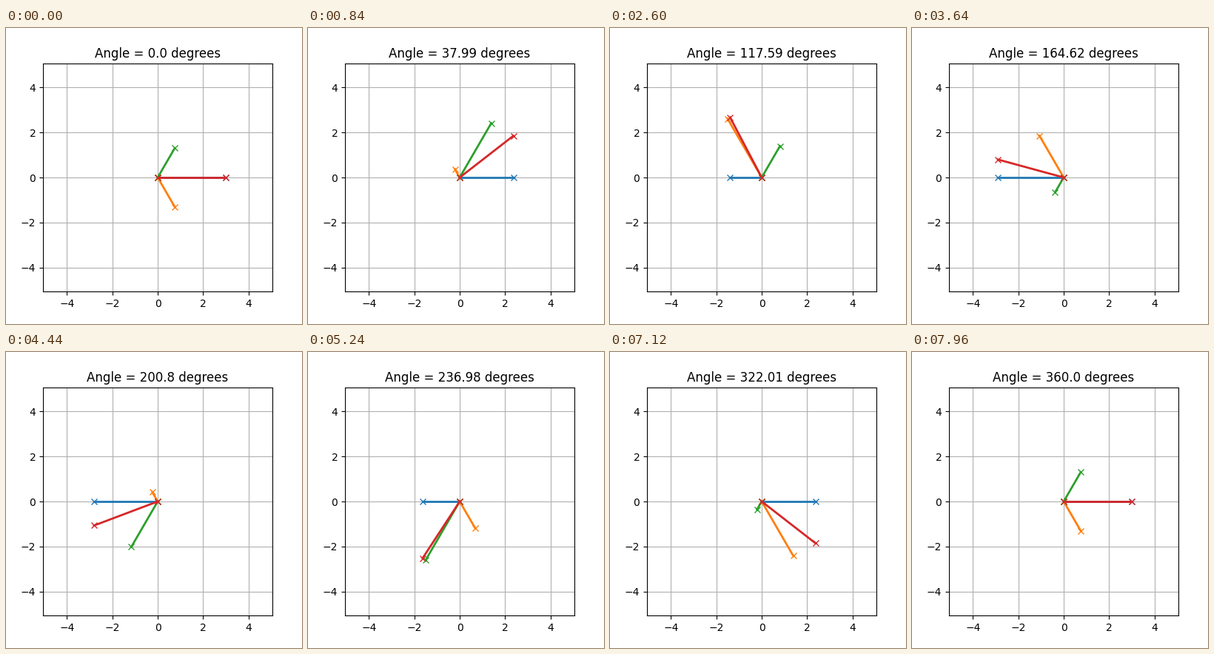
Animation, 400 px wide and 400 px high, one loop 8000 ms. Source, as a matplotlib script:

```python
import numpy as np
import matplotlib.pyplot as plt
from matplotlib.animation import FuncAnimation

FRAMES = 200
INTERVAL = 40
RADIUS = 3
LIMIT = 5.05
AXES = np.radians([0, 120, 240])  # directions of the three phases

fig, ax = plt.subplots(figsize=(4, 4), dpi=100)
ax.set_xlim(-LIMIT, LIMIT)
ax.set_ylim(-LIMIT, LIMIT)
ax.grid(True)
title = ax.set_title("")
colors = ["tab:blue", "tab:orange", "tab:green", "tab:red"]
lines = [ax.plot([], [], "x-", lw=2, color=c)[0] for c in colors]


def update(i):
    angle = 360 * i / (FRAMES - 1)
    theta = np.radians(angle)
    # Projections on each phase axis, then the rotating vector itself
    lengths = [*(RADIUS * np.cos(theta - AXES)), RADIUS]
    for line, r, a in zip(lines, lengths, [*AXES, theta]):
        line.set_data([0, r * np.cos(a)], [0, r * np.sin(a)])
    title.set_text(f"Angle = {round(angle, 2)} degrees")
    return [*lines, title]


anim = FuncAnimation(fig, update, frames=FRAMES, interval=INTERVAL,
                     init_func=lambda: update(0), repeat=True, repeat_delay=0)
plt.show()
```
